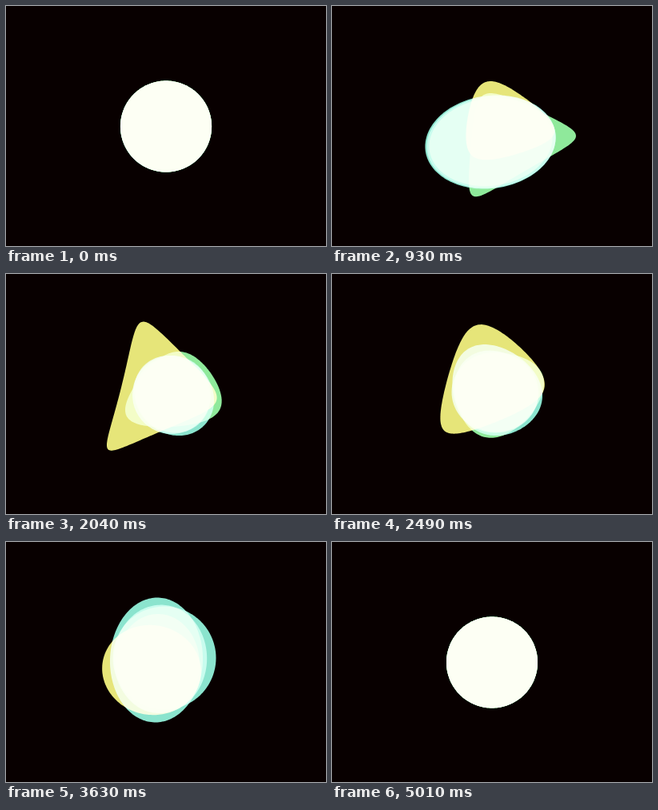
Recreate the animation shown at these times as an HTML page with a canvas. Size 400x300 px, loop 5.04 s.

```html
<!DOCTYPE html>
<html lang="en">
<head>
<meta charset="utf-8">
<title>Blobs</title>
<style>
html, body { margin: 0; width: 100%; height: 100%; overflow: hidden; background: #080000; }
canvas { display: block; width: 100%; height: 100%; }
</style>
</head>
<body>
<canvas width="400" height="300"></canvas>
<script>
const LOOP = 5040;
const TIMES = [0, 930, 1500, 2040, 2970, 3630, 4950];
const LAST = TIMES.length - 1;
const ctx = document.querySelector('canvas').getContext('2d');

const polar = (length, degrees) => {
  const a = degrees * Math.PI / 180;
  return [length * Math.cos(a), length * Math.sin(a)];
};

// A circle stretched along one direction (oval) and pulled into three corners,
// one of which points along triDir
const shape = (cx, cy, r, oval = 0, ovalDir = 0, tri = 0, triDir = 0) =>
  [cx, cy, r, ...polar(oval, 2 * ovalDir), ...polar(tri, 3 * triDir)];

const rest = shape(200, 150.5, 57);
const blob = (color, ...poses) => ({ color, poses: [rest, ...poses, rest] });

const yellow = blob('#e6e57e',
  shape(216, 147, 51, 4, 10, 8, 10),
  shape(212, 149, 49.5, 2),
  shape(186, 146, 68, 9, 115, 18, 12),
  shape(204, 129, 57, 6, -20),
  shape(182, 160, 59, 3, 10));
const green = blob('#8ce9a2',
  shape(224, 171, 62, 8, -31, 15, 120),
  shape(211, 150, 50),
  shape(210, 150, 53, 7, -15, 6, 150),
  shape(203, 148, 55, 5, 95, 12, 95),
  shape(190, 152, 57, 5, 90));
const teal = blob('#88e4d8',
  shape(198, 170, 70, 12, -8),
  shape(221, 155, 58, 5, -35),
  shape(210, 152, 50, 3, 45),
  shape(199, 140, 65, 3, 60, 4),
  shape(188, 147.5, 68, 10, 92));
const aqua = blob(teal.color,
  shape(199, 170, 69, 12, -8),
  shape(218, 152, 55, 4, -20),
  shape(207, 151, 49),
  shape(202, 145, 58, 4),
  shape(198, 145, 64.5));
// A slightly smaller blob halfway between the two above
const core = {
  color: teal.color,
  poses: teal.poses.map((pose, i) =>
    pose.map((v, n) => (v + aqua.poses[i][n]) / 2 * (n < 2 ? 1 : 0.95)))
};
const blobs = [yellow, green, teal, aqua, core];

// Cubic Hermite interpolation that starts fast and comes to rest
function poseAt(poses, t) {
  if (t >= TIMES[LAST]) return poses[LAST];
  const i = TIMES.findIndex(time => time > t) - 1;
  const span = TIMES[i + 1] - TIMES[i], u = (t - TIMES[i]) / span;
  const rate = (j, k, n) => (poses[k][n] - poses[j][n]) / (TIMES[k] - TIMES[j]);
  const slope = (j, n) =>
    j === 0 ? 2 * rate(0, 1, n) : j === LAST ? 0 : rate(j - 1, j + 1, n);
  return poses[i].map((v, n) =>
    v + (poses[i + 1][n] - v) * u * u * (3 - 2 * u) +
    span * u * (1 - u) * ((1 - u) * slope(i, n) - u * slope(i + 1, n)));
}

function drawBlob({ color, poses }, t) {
  const [cx, cy, r, ox, oy, tx, ty] = poseAt(poses, t);
  ctx.beginPath();
  for (let d = 0; d < 360; d += 2) {
    const [c, s] = polar(1, d), [c2, s2] = polar(1, 2 * d);
    ctx.lineTo(
      cx + r * c + ox * c + oy * s + tx * c2 + ty * s2,
      cy + r * s + oy * c - ox * s + ty * c2 - tx * s2);
  }
  ctx.fillStyle = color;
  ctx.fill();
}

function fillStage(mode, color) {
  ctx.globalCompositeOperation = mode;
  ctx.fillStyle = color;
  ctx.fillRect(0, 0, 400, 300);
}

const start = performance.now();
function frame() {
  const t = (performance.now() - start) % LOOP;
  fillStage('source-over', '#080000');
  ctx.globalCompositeOperation = 'screen';
  blobs.forEach(b => drawBlob(b, t));
  fillStage('multiply', '#fefff4');
  requestAnimationFrame(frame);
}
frame();
</script>
</body>
</html>
```
